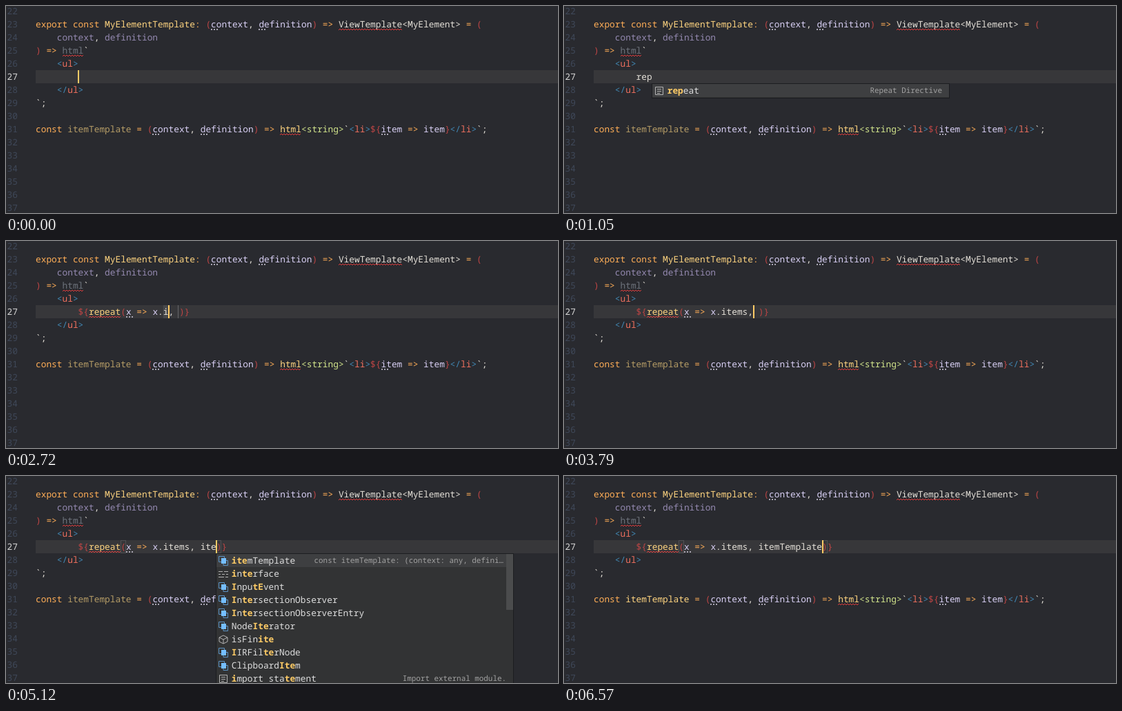
An HTML page with a canvas that plays this animation: 800x300 px, repeating every 6970 ms.

```html
<!DOCTYPE html>
<html lang="en">
<head>
<meta charset="utf-8">
<title>Template snippet in a code editor</title>
<style>
  html, body { margin: 0; width: 100%; height: 100%; overflow: hidden; background: #292a2f; }
  canvas { display: block; }
</style>
</head>
<body>
<canvas id="stage" width="800" height="300"></canvas>
<script>
const ctx = document.getElementById('stage').getContext('2d');
const LOOP = 6970, CHAR = 7.7, ROW = 19, LEFT = 43;
const FONT = '12.833px "Noto Sans Mono", monospace';
const SMALL = '10.908px "Noto Sans Mono", monospace';
const C = {
  orange: '#ffae57', yellow: '#ffd580', tan: '#b59c66', red: '#bd4545', lilac: '#d9d0f5',
  faded: '#9489b0', white: '#e4e0d8', grey: '#6d727b', blue: '#4288b5', tag: '#f0705f',
  green: '#d3e68c', wave: '#e23c3c', dots: '#aaa6b4', caret: '#ffcc66'
};

const colX = col => LEFT + col * CHAR;
const rowY = line => 93 + (line - 27) * ROW;
const between = (t, a, b) => t >= a && t < b;
const latest = (steps, t) => steps.reduce((value, [start, next]) => t >= start ? next : value, '');

function rect(color, x, y, w, h) {
  ctx.fillStyle = color;
  ctx.fillRect(x, y, w, h);
}

function text(str, x, y, color, font = FONT, align = 'left') {
  ctx.font = font;
  ctx.textAlign = align;
  ctx.fillStyle = color;
  ctx.fillText(str, x, y);
}

// A line of code as alternating colour names and strings.
function code(line, col, ...tokens) {
  for (let i = 0; i < tokens.length; i += 2) {
    text(tokens[i + 1], colX(col), rowY(line) + 14, C[tokens[i]]);
    col += tokens[i + 1].length;
  }
}

function squiggle(line, col, length) {
  const x = Math.round(colX(col)), y = rowY(line) + 18;
  ctx.beginPath();
  ctx.moveTo(x, y);
  for (let dx = 2, up = true; dx <= length * CHAR; dx += 2, up = !up) ctx.lineTo(x + dx, y - (up ? 2 : 0));
  ctx.strokeStyle = C.wave;
  ctx.lineWidth = 1;
  ctx.stroke();
}

function hint(line, col) {
  for (let i = 0; i < 3; i++) rect(C.dots, Math.round(colX(col)) + i * 4, rowY(line) + 16, 2, 2);
}

// Draws an icon inside a 14 px box whose top left corner is x, y.
const icons = {
  v() {
    rect('#75beff', 4, 3, 7, 8);
    ctx.strokeStyle = '#5b93c4';
    ctx.stroke(new Path2D('M4 8.5H.5V.5H8.5V3M7 11V13.5H13.5V6.5H11'));
  },
  k() {
    ctx.stroke(new Path2D('M0 3.5H6M8 3.5H14M0 7.5H3M5 7.5H9M11 7.5H14M0 11.5H8M10 11.5H14'));
  },
  m() {
    ctx.stroke(new Path2D('M7 1L13 4V10L7 13L1 10V4ZM1 4L7 7L13 4M7 7V13'));
  },
  s() {
    ctx.stroke(new Path2D('M1.5 1.5H12.5V12.5H1.5ZM4 4.5H10M4 7.5H10M4 10.5H8'));
  }
};

// Positions of the typed letters in a label, keeping them together where possible.
function matches(label, query, from = 0) {
  if (!query) return [];
  const low = label.toLowerCase(), whole = low.indexOf(query, from);
  if (whole >= 0) return [...query].map((_, i) => whole + i);
  const first = low.indexOf(query[0], from);
  return first < 0 ? [] : [first, ...matches(label, query.slice(1), first + 1)];
}

const ref = 's|ref|Ref Directive', repeat = 's|repeat|Repeat Directive';
const refs = [ref, repeat, 's|ref|Triple-slash reference'];
const item = 'v|itemTemplate|const itemTemplate: (context: any, defini…';
const importer = 's|import statement|Import external module.';
const lists = {
  r: refs,
  re: refs,
  rep: [repeat],
  i: [item, 'k|if', 'k|implements', 'k|import', 'm|importScripts', 'k|in', 'v|indexedDB',
    'v|innerHeight', 'v|innerWidth', 'k|instanceof'],
  it: [item, 'k|interface', 'k|instanceof', 'v|InputEvent', 'v|IntersectionObserver',
    'v|IntersectionObserverEntry', 'v|NodeIterator', 'm|isFinite', 'v|IIRFilterNode', importer],
  ite: [item, 'k|interface', 'v|InputEvent', 'v|IntersectionObserver', 'v|IntersectionObserverEntry',
    'v|NodeIterator', 'm|isFinite', 'v|IIRFilterNode', 'v|ClipboardItem', importer],
  item: [item, 'v|ClipboardItem', 'v|DataTransferItem', 'v|DataTransferItemList',
    'v|HTMLInputElement', 'v|SVGFilterElement', 'v|HTMLTitleElement', importer]
};

function popup(query, col) {
  const rows = lists[query], x = Math.floor(colX(col)), y = 113, w = 431;
  const h = rows.length * ROW;
  rect('#1c1d20', x, y - 1, w + 1, h + 3);
  rect('#323334', x + 1, y, w - 1, h + 1);
  rect('#3e3f41', x + 1, y, w - 1, ROW);
  rows.forEach((row, i) => {
    const [icon, label, detail] = row.split('|');
    const top = y + i * ROW, hits = matches(label, query);
    ctx.save();
    ctx.translate(x + 4, top + 3);
    ctx.strokeStyle = '#b4b4b4';
    ctx.lineWidth = 1;
    icons[icon]();
    ctx.restore();
    [...label].forEach((ch, j) => {
      const hit = hits.includes(j);
      text(ch, x + 22.7 + j * CHAR, top + 13.5, hit ? C.caret : '#dedede', hit ? 'bold ' + FONT : FONT);
    });
    if (detail) text(detail, x + (detail.endsWith('…') ? 417 : 421), top + 13, '#a2a2a2', SMALL, 'right');
  });
  if (query === 'it' || query === 'ite') rect('#4b4c4d', x + w - 10, y, 10, 81);
}

function drawFixedCode(t) {
  for (let n = 22; n <= 37; n++) text(n, 1.6, rowY(n) + 14, n === 27 ? '#d6d6d6' : '#3f4859');
  code(23, 0, 'orange', 'export const ', 'yellow', 'MyElementTemplate', 'orange', ': ', 'red', '(',
    'lilac', 'context', 'white', ', ', 'lilac', 'definition', 'red', ')', 'orange', ' => ',
    'white', 'ViewTemplate<MyElement>', 'orange', ' = ', 'red', '(');
  code(24, 4, 'faded', 'context', 'white', ', ', 'faded', 'definition');
  code(25, 0, 'red', ')', 'orange', ' => ', 'grey', 'html', 'white', '`');
  code(26, 4, 'blue', '<', 'tag', 'ul', 'blue', '>');
  code(28, 4, 'blue', '</', 'tag', 'ul', 'blue', '>');
  code(29, 0, 'white', '`;');
  code(31, 0, 'orange', 'const ', t < 5980 ? 'tan' : 'yellow', 'itemTemplate', 'orange', ' = ', 'red', '(',
    'lilac', 'context', 'white', ', ', 'lilac', 'definition', 'red', ')', 'orange', ' => ',
    'yellow', 'html', 'green', '<string>', 'white', '`', 'blue', '<', 'tag', 'li', 'blue', '>',
    'red', '${', 'lilac', 'item', 'orange', ' => ', 'lilac', 'item', 'red', '}',
    'blue', '</', 'tag', 'li', 'blue', '>', 'white', '`;');
  squiggle(23, 57, 12);
  squiggle(25, 5, 4);
  squiggle(31, 46, 4);
  [[23, 33], [23, 42], [31, 22], [31, 31], [31, 65]].forEach(place => hint(...place));
}

const words = [[330, 'r'], [460, 're'], [590, 'rep']];
const props = [[1450, 'property_name'], [2720, 'i'], [2790, 'it'], [2860, 'ite'], [3060, 'item'], [3260, 'items']];
const args = [[4920, 'i'], [5050, 'it'], [5120, 'ite'], [5190, 'item'], [5650, 'itemTemplate']];
const caretOff = [[70, 330], [1050, 1450], [1920, 2450], [4460, 4920], [6110, 6570]];

function draw(t) {
  const y = rowY(27), word = latest(words, t), prop = latest(props, t), arg = latest(args, t);
  const expanded = t >= 1450, selected = between(t, 1450, 2720);
  const propEnd = 24 + prop.length, argEnd = propEnd + 2 + arg.length;
  const caret = !expanded ? 8 + word.length : t < 3790 ? propEnd : t < 3990 ? propEnd + 1 : argEnd;

  rect('#292a2f', 0, 0, 800, 300);
  if (!selected) rect('#37373a', LEFT, y, 800 - LEFT, ROW);
  if (between(t, 1450, 3790)) {
    rect(selected ? '#515256' : '#47484b', colX(24), y, prop.length * CHAR, ROW);
    rect('#66676a', Math.floor(colX(argEnd)) - 1, y, 1, ROW);
  }
  drawFixedCode(t);

  if (expanded) {
    code(27, 8, 'red', '${', 'yellow', 'repeat', 'red', '(', 'lilac', 'x', 'orange', ' => ',
      'lilac', 'x', 'white', '.' + prop + ', ' + arg, 'red', ')}');
    if (t >= 1850) {
      squiggle(27, 10, 6);
      hint(27, 17);
    }
    if (t >= 4060) {
      ctx.strokeStyle = 'rgba(255,255,255,.13)';
      ctx.lineWidth = 1;
      for (const col of [16, argEnd]) ctx.strokeRect(Math.floor(colX(col)) + .5, y + .5, 7, ROW - 1);
    }
  } else {
    code(27, 8, 'white', word);
  }

  if (between(t, 400, 1450)) popup(word, caret);
  if (between(t, 4990, 5650)) popup(arg, caret);
  if (!caretOff.some(([a, b]) => between(t, a, b))) rect(C.caret, Math.floor(colX(caret)), y, 2, ROW);
}

ctx.textRendering = 'geometricPrecision';
function tick() {
  draw(performance.now() % LOOP);
  requestAnimationFrame(tick);
}
tick();
</script>
</body>
</html>
```
